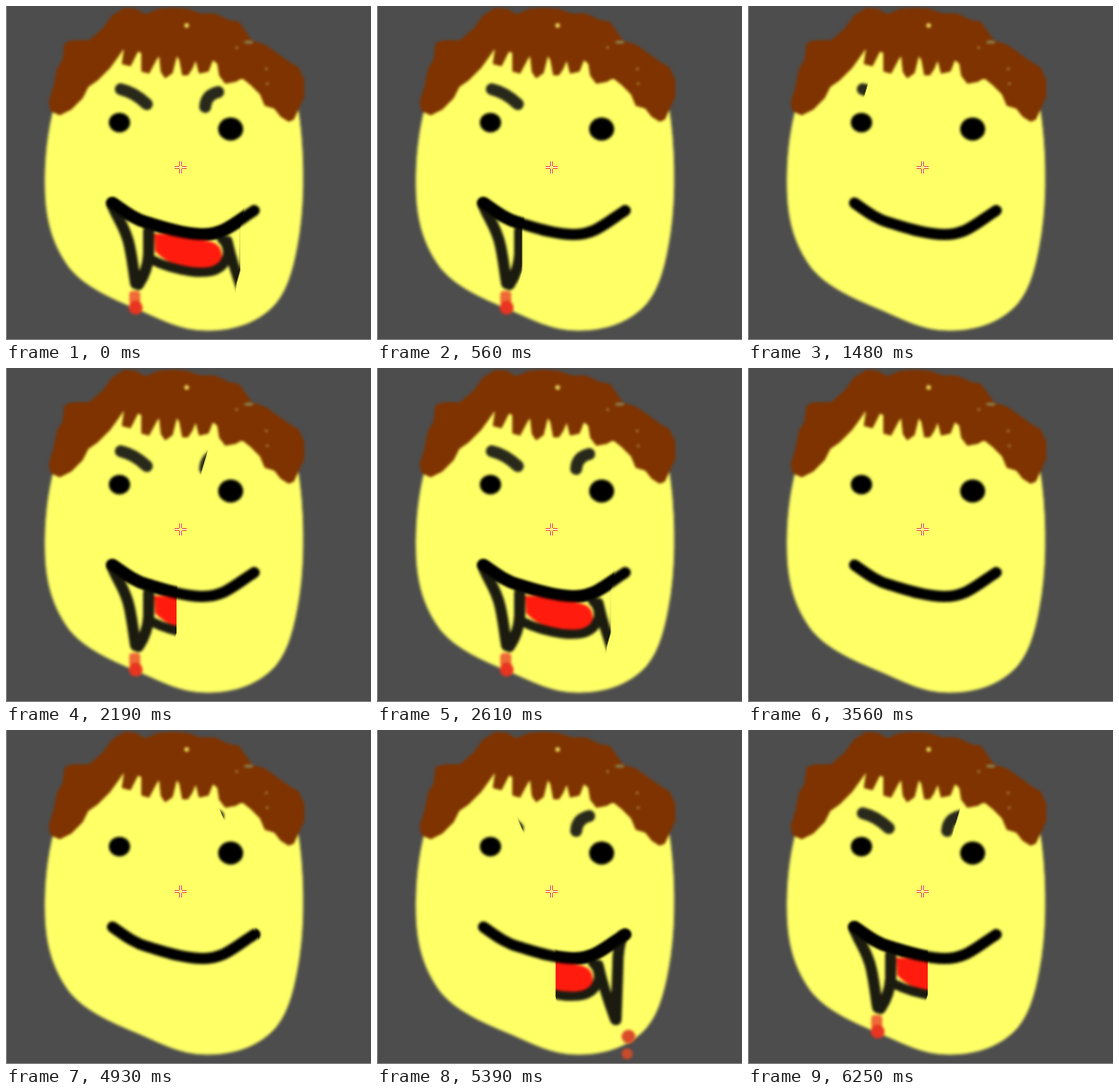
These frames come from a looping animation (394x361 px, 6.35 s). An HTML page:

```html
<!DOCTYPE html>
<html lang="en">
<head>
<meta charset="utf-8">
<title>Vampire grin</title>
<style>
  html, body { margin: 0; width: 100%; height: 100%; overflow: hidden; background: #4d4d4d; }
  svg { display: block; width: 394px; height: 361px; }
  .soft { filter: blur(1.6px); }
  .line { fill: none; stroke-linecap: round; stroke-linejoin: round; }
  #reveal { animation: sweep 6350ms linear infinite; }

  /* The window sweeps out left, across to the right, and back. */
  @keyframes sweep {
    0% { transform: translateX(253px); }
    10.55% { transform: translateX(138px); }
    19.69% { transform: translateX(83px); }
    20.71% { transform: translateX(80px); }
    21.73% { transform: translateX(84px); }
    23.31% { transform: translateX(94px); }
    31.18% { transform: translateX(146px); }
    34.49% { transform: translateX(184px); }
    42.83% { transform: translateX(270px); }
    48.03% { transform: translateX(354px); }
    56.06% { transform: translateX(447px); }
    66.77% { transform: translateX(470px); }
    77.64% { transform: translateX(441px); }
    84.88% { transform: translateX(358px); }
    90.71% { transform: translateX(270px); }
    97.48% { transform: translateX(204px); }
    98.43%, 100% { transform: translateX(194px); }
  }
</style>
</head>
<body>
<svg viewBox="0 0 394 361">
  <defs>
    <clipPath id="window">
      <polygon id="reveal" points="36,60 36,82 27,112 0,240 0,286 -4,300 -12,361 -153,361 -165,288 -165,240 -199,112 -212,82 -212,60"/>
    </clipPath>
    <path id="smile" class="line" stroke="#000" stroke-width="12" d="M115 213C128 222 138 230 152 234S189 247 212 247S245 236 268 221"/>
  </defs>

  <rect width="394" height="361" fill="#4d4d4d"/>
  <path d="M0.5 0V360.5H394" fill="none" stroke="#808080"/>

  <g class="soft">
    <path fill="#ffff66" stroke="#a3a35c" stroke-width="1" d="M52 108C45 135 41 165 42 200C43 234 51 260 69 284C86 304 113 316 142 328C168 339 188 351 217 351C249 351 274 341 291 322C306 304 312 277 317 245C323 205 322 150 315 108L270 45H100Z"/>
    <path fill="#7f3300" stroke="#7f3300" stroke-width="2" stroke-linejoin="round" d="M47 104L52 88L56 68L62 58L64 41L72 38L90 38L105 25L115 11L128 3L140 4L150 10L165 4L180 3L195 4L210 9L225 9L240 16L251 18L258 28L265 38L280 43L291 51L305 61L315 67L321 80L321 98L315 111L310 122L305 124L297 119L290 110L280 107L275 95L265 85L255 77L248 81L237 83L231 75L229 62L223 57L218 70L209 72L205 56L200 68L196 74L191 74L188 58L184 52L179 72L172 77L168 71L166 52L162 57L154 72L147 70L147 50L142 48L134 64L126 62L129 42L120 55L112 66L98 80L88 87L82 99L70 111L58 117L49 113Z"/>
    <g fill="#b5984a">
      <circle cx="195" cy="21" r="2.5" fill="#f0e060"/>
      <ellipse cx="262" cy="39" rx="5" ry="1.6" fill="#8c8c58"/>
      <circle cx="249" cy="45" r="1.3"/>
      <circle cx="281" cy="68" r="1.3"/>
      <circle cx="282" cy="84" r="1.3"/>
    </g>
    <ellipse cx="122.500" cy="126" rx="11.500" ry="10.500"/>
    <ellipse cx="242.500" cy="133" rx="13.500" ry="12.500"/>
    <use href="#smile"/>
  </g>

  <g clip-path="url(#window)">
    <g class="soft">
      <g class="line" stroke="#29291b" stroke-width="13">
        <path d="M124 90Q138 93 152 106"/>
        <path d="M215 109Q216 96 229 93"/>
      </g>
      <path fill="#ff1c0e" d="M160 246L161 265Q169 274 182 279T214 284T233 271T222 255T184 247Z"/>
      <g class="line" stroke="#1b1b10">
        <path stroke-width="12" d="M114 213C119 228 129 239 133 258C137 276 138 290 140 300"/>
        <path stroke-width="12" d="M154 243V268Q153 286 143 301"/>
        <path stroke-width="10" d="M157 274Q174 283 199 287C222 290 236 285 239 269Q240 258 233 252"/>
        <path stroke-width="11" d="M239 254Q245 281 257 313"/>
        <path stroke-width="12" d="M265 222Q260 234 260 255L258 313"/>
      </g>
      <use href="#smile"/>
      <rect x="133" y="308" width="12" height="15" rx="4" fill="#ef6a38"/>
      <circle cx="140" cy="326" r="7.500" fill="#e83420"/>
      <circle cx="271.500" cy="331.500" r="7.500" fill="#d94c2b"/>
      <circle cx="270" cy="350" r="6" fill="#c94b2b"/>
    </g>
  </g>

  <g fill="none">
    <path stroke="#e8643c" stroke-width="3" d="M182 174.500H187M190 174.500H195M188.500 168V173M188.500 176V181"/>
    <path stroke="#fff" d="M182 174.500H187M190 174.500H195M188.500 168V173M188.500 176V181"/>
  </g>
</svg>
</body>
</html>
```
